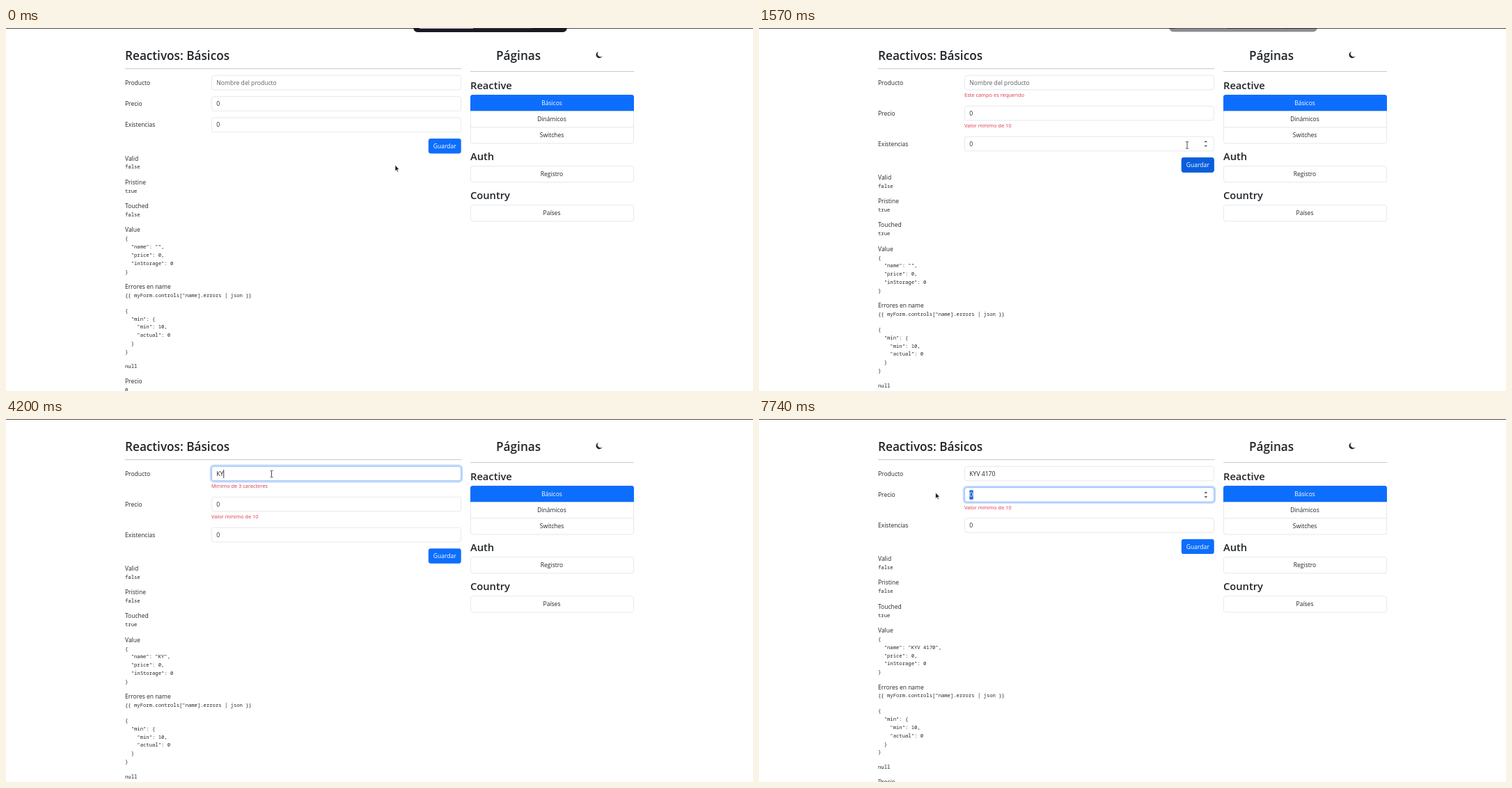
These frames come from a looping animation (1073x522 px, 8000 ms). An HTML page:

```html
<!DOCTYPE html>
<html lang="es">
<head>
<meta charset="utf-8">
<title>Reactivos: Básicos</title>
<style>
html, body { margin: 0; width: 100%; height: 100%; overflow: hidden; background: #fff; }
svg { display: block; width: 100%; height: 100%; }
text { font: 8.5px "Open Sans", "Noto Sans", sans-serif; fill: #212529; white-space: pre; }
.h2 { font-size: 17.2px; font-weight: 600; }
.h3 { font-size: 14.7px; font-weight: 600; }
.mono { font: 7.22px "Noto Sans Mono", "DejaVu Sans Mono", monospace; }
.err { font-size: 7.45px; fill: #dc3545; }
.input { font-size: 8.6px; }
.hint { font-size: 8.6px; fill: #5a5e62; }
.mid { text-anchor: middle; }
.white { fill: #fff; }
.line { fill: none; stroke: #dee2e6; stroke-width: .8; }
.rule { stroke: #c8c9ca; }
</style>
</head>
<body>
<svg viewBox="0 0 1073 522">
  <rect width="1073" height="1" fill="#4b4b4d"/>
  <text class="h2" x="171" y="45.6">Reactivos: Básicos</text>
  <path class="rule" d="M171 58.5H654M667 62.5H902"/>
  <text class="h2" x="704" y="45.6">Páginas</text>
  <path transform="translate(848 33.8) scale(.57)" d="M5.6.2A7.3 7.3 0 0 0 15 11.7A8.3 8.3 0 1 1 5.6.2z" fill="#212529"/>
  <g id="side"></g>
  <g id="form"></g>
  <g id="bar">
    <path d="M585 0H806Q805 6 799 6H592Q586 6 585 0z" fill="#1b1a20"/>
    <path d="M594 .5H671" stroke="#b4b5ee"/>
    <path d="M671 .5H756" stroke="#3f3e45"/>
  </g>
  <g id="cursor"></g>
</svg>
<script>
const LOOP = 8000, CLICK = 1540, FOCUS = 2300, PRESS = 7230, BLINK = 530;
const NAME = "KYV 4170";
const KEYS = [3700, 4200, 4430, 4760, 5620, 5690, 6120, 6260];
// pointer stops: time, x, y
const STOPS = [
  [0, 559, 197.3], [330, 559, 197.3], [750, 351, 84], [1130, 635, 171], [1570, 615, 168.5],
  [1930, 389, 80], [2490, 381.5, 79], [6790, 381.5, 79], [7000, 306, 70.5],
  [7230, 309, 109], [7570, 249, 102], [7740, 253.7, 106], [LOOP, 253.7, 106]
];
const SHAPES = {
  arrow: '<path d="M0 0V8.4L2 6.6L3.3 9.6L4.6 9L3.3 6.1H5.8z" fill="#111" stroke="#fff" stroke-width=".6"/>',
  beam: '<path d="M-2-4.8H-.6L0-4.3L.6-4.8H2M0-4.3V4.3M-2 4.8H-.6L0 4.3L.6 4.8H2" fill="none" stroke="#333" stroke-width=".9"/>',
  hand: '<path d="M-.9 0Q0-1 .9 0V3.6L5 4.6Q5.8 5 5.6 6.5L4.8 10H-.4L-3 6.4Q-2.4 5-.9 6z" fill="#fff" stroke="#111" stroke-width=".7"/>'
};

const $ = id => document.getElementById(id);
const pen = document.createElement("canvas").getContext("2d");
const clamp = v => Math.min(1, Math.max(0, v));
const ease = v => (v = clamp(v)) * v * (3 - 2 * v);
const fadeIn = (t, from) => ease((t - from) / 150);
const text = (x, y, s, cls = "") => `<text x="${x}" y="${y}" class="${cls}">${s}</text>`;
const box = (x, y, w, h, attrs) => `<rect x="${x}" y="${y}" width="${w}" height="${h}" ${attrs}/>`;

function group(title, top, items, active) {
  const h = 23.2;
  let out = text(667, top - 8.6, title, "h3") +
    box(667.4, top, 234.2, h * items.length, 'rx="3.5" class="line"');
  items.forEach((s, i) => {
    const on = i === active, y = top + i * h;
    if (on) out += `<path d="M667 ${y + h}V${y + 3}q0-3.4 3.5-3.4H898.5q3.5 0 3.5 3.4V${y + h}z" fill="#0d6efd"/>`;
    else if (i) out += `<path class="line" d="M667.4 ${y}H901.6"/>`;
    out += text(784, y + 14.6, s, on ? "mid white" : "mid");
  });
  return out;
}

function pointer(t) {
  const i = STOPS.findIndex(p => p[0] > t);
  const [t0, x0, y0] = STOPS[i - 1], [t1, x1, y1] = STOPS[i];
  const k = ease((t - t0) / (t1 - t0));
  return [x0 + (x1 - x0) * k, y0 + (y1 - y0) * k];
}

function field(label, cy, value, cls, ring, spin) {
  const y = cy - 10.3;
  let out = text(171, cy + 3.1, label) + box(295.4, y, 358.2, 20.6, 'rx="3.4" class="line"');
  if (ring > 0) out +=
    box(293.9, y - 1.5, 361.2, 23.6, `rx="4.6" fill="none" stroke="#0d6efd" stroke-width="2.2" opacity="${.25 * ring}"`) +
    box(295.4, y, 358.2, 20.6, `rx="3.4" fill="none" stroke="#86b7fe" stroke-width=".8" opacity="${ring}"`);
  if (spin) out += `<path d="M639.4 ${cy - 2.2}l2.4-2.4l2.4 2.4zM639.4 ${cy + 2.2}l2.4 2.4l2.4-2.4z" fill="#555"/>`;
  return out + text(302.3, cy + 3.1, value, cls);
}

// stacks labels and code lines downwards
function report(y, blocks) {
  let out = "";
  for (const [label, ...lines] of blocks) {
    if (label) {
      out += text(171, y + 3, label);
      y += 12.3;
    }
    lines.forEach((s, i) => out += text(171, y + 2.6 + i * 11.8, s, "mono"));
    y += (lines.length - 1) * 11.8 + (label ? 22 : 21.5);
    if (lines[0] === "{{") y -= 1;
  }
  return out;
}

function draw(t) {
  const [px, py] = pointer(t);
  const touched = t >= CLICK;
  const typed = KEYS.filter(k => k <= t).length;
  const name = NAME.slice(0, typed);
  const nameError = touched && typed < 3;
  const d1 = nameError ? 13.6 : 0, d = d1 + (touched ? 13.6 : 0);
  const rows = [78.5, 108.9 + d1, 139.3 + d];
  const inRow = rows.map(y => px > 295 && px < 654 && Math.abs(py - y) < 11);
  const onButton = px > 607 && px < 654 && Math.abs(py - 170 - d) < 11;

  const left = fadeIn(t, PRESS);
  const ring = fadeIn(t, FOCUS) * (1 - left);
  const selected = t >= PRESS && px < 303;
  let out = field("Producto", rows[0], name || "Nombre del producto", name ? "input" : "hint", ring);
  if (selected) out += box(302.4, rows[1] - 6.5, 5.2, 13.3, 'fill="#1d63cc"');
  out += field("Precio", rows[1], 0, selected ? "input white" : "input", left, inRow[1] || t >= PRESS);
  out += field("Existencias", rows[2], 0, "input", 0, inRow[2]);
  if (nameError) out += text(295, rows[0] + 20.8, typed ? "Mínimo de 3 caracteres" : "Este campo es requerido", "err");
  if (touched) out += text(295, rows[1] + 20.8, "Valor mínimo de 10", "err");

  const since = Math.max(FOCUS, ...KEYS.slice(0, typed));
  if (t >= FOCUS && t < PRESS && (t - since) % (2 * BLINK) < BLINK) {
    pen.font = '8.6px "Open Sans", "Noto Sans", sans-serif';
    out += box(302.3 + pen.measureText(name).width, 73, .8, 12, 'fill="#111"');
  }

  const hover = touched ? 1 - fadeIn(t, CLICK) : onButton ? fadeIn(t, 1080) : 0;
  out += box(606.8, 159.1 + d, 46.9, 21.4, 'rx="3.4" fill="#0d6efd"') +
    box(606.8, 159.1 + d, 46.9, 21.4, `rx="3.4" fill="#0b5ed7" opacity="${hover}"`) +
    text(630.2, 172.9 + d, "Guardar", "mid white");

  $("form").innerHTML = out + report(187.5 + d, [
    ["Valid", false],
    ["Pristine", !typed],
    ["Touched", touched],
    ["Value", "{", `  "name": "${name}",`, '  "price": 0,', '  "inStorage": 0', "}"],
    ["Errores en name", '{{ myForm.controls["name].errors | json }}'],
    ["", "{", '  "min": {', '    "min": 10,', '    "actual": 0', "  }", "}"],
    ["", "null"],
    ["Precio", 0]
  ]);

  const fade = clamp((t - 1480) / 180), s = 1 - .07 * fade;
  $("bar").setAttribute("opacity", 1 - fade);
  $("bar").setAttribute("transform", `translate(${695.5 * (1 - s)} ${-fade}) scale(${s} 1)`);

  const kind = inRow.includes(true) ? "beam" : onButton ? "hand" : "arrow";
  $("cursor").innerHTML = SHAPES[kind];
  $("cursor").setAttribute("transform", `translate(${px} ${py})`);
}

$("side").innerHTML = group("Reactive", 96.4, ["Básicos", "Dinámicos", "Switches"], 0) +
  group("Auth", 198.6, ["Registro"]) + group("Country", 254.7, ["Países"]);

const start = performance.now();
function tick() {
  draw((performance.now() - start) % LOOP);
  requestAnimationFrame(tick);
}
tick();
</script>
</body>
</html>
```
